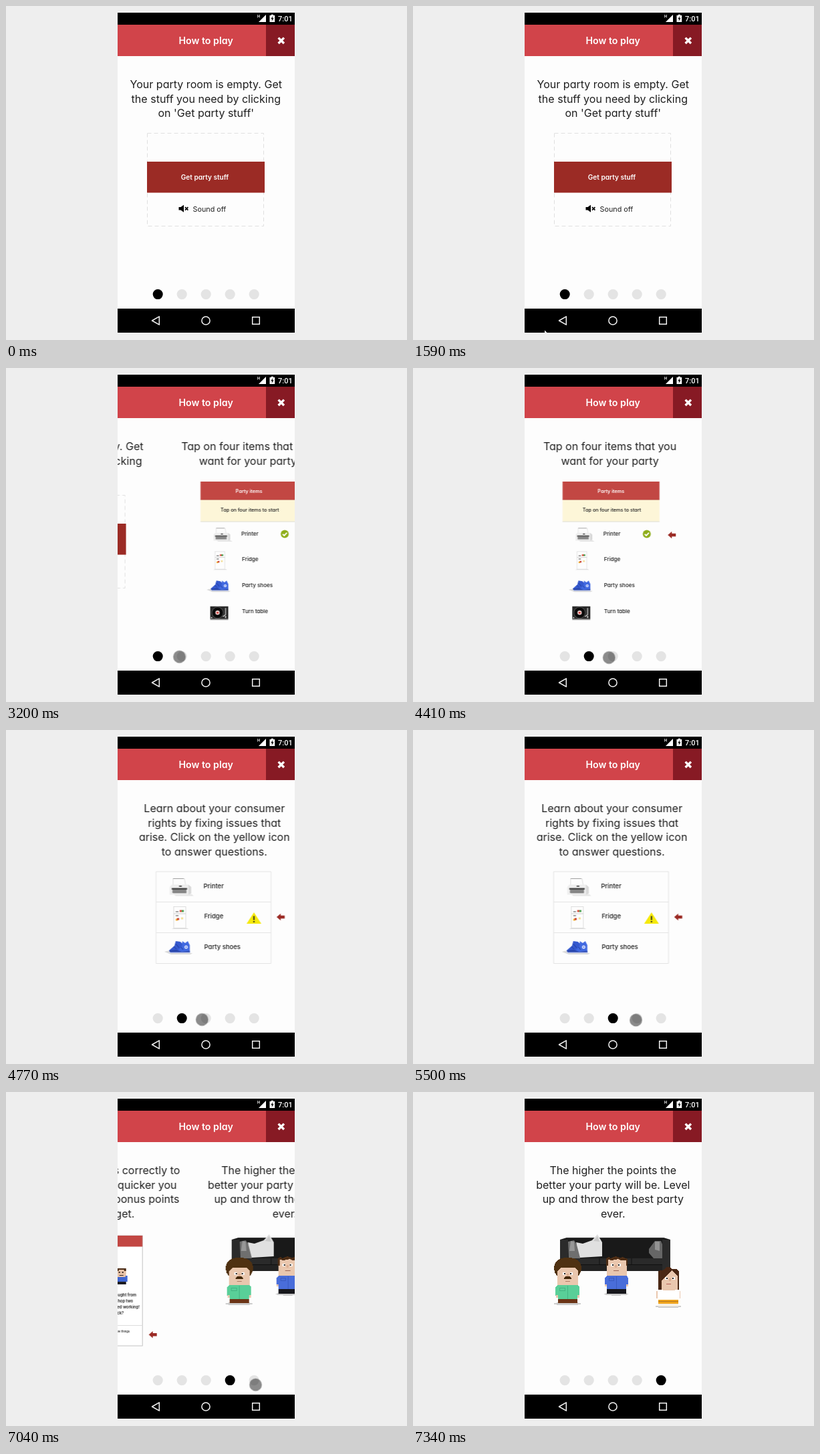
Animation, 600 px wide and 500 px high, one loop 8330 ms. Source, as an HTML page:

```html
<!DOCTYPE html>
<html lang="en">
<head>
<meta charset="utf-8">
<title>How to play</title>
<style>
html, body { margin: 0; width: 100%; height: 100%; overflow: hidden; background: #eee; }
svg { display: block; width: 100vw; height: 100vh; }
text { font-family: Inter, "Open Sans", sans-serif; font-feature-settings: "cv11"; fill: #1f1f1f; }
.lead { font-size: 16.05px; text-anchor: middle; }
.mid { text-anchor: middle; }
.white { fill: #fff; }
.bold { font-weight: 600; }
.semi { font-weight: 500; }
.red { fill: #c24743; }
.brick { fill: #9b2b25; }
.dots { fill: #e4e4e4; }
.crisp { shape-rendering: crispEdges; }

.track, .active, .touch, .mouse { animation: 8.33s infinite; }
.track { animation-name: slide; animation-timing-function: cubic-bezier(.3, .05, .35, 1); }
.active { animation-name: step; animation-timing-function: step-end; }
.touch { animation-name: tap; animation-timing-function: ease-out; }
.mouse { animation-name: peek; animation-timing-function: step-end; }

@keyframes slide {
  0%, 35.234% { transform: translateX(0); }
  41.236%, 52.653% { transform: translateX(-270px); }
  58.655%, 65.894% { transform: translateX(-540px); }
  71.897%, 82.233% { transform: translateX(-810px); }
  88.055%, 100% { transform: translateX(-1080px); }
}
@keyframes step {
  0% { transform: translateX(0); }
  41.236% { transform: translateX(36px); }
  58.655% { transform: translateX(72px); }
  71.897% { transform: translateX(108px); }
  87.995%, 100% { transform: translateX(144px); }
}
@keyframes tap {
  0%, 20.16% { transform: translate(206px, 482px); opacity: 0; }
  20.168% { transform: translate(206px, 482px); opacity: 1; }
  27.131%, 42.257% { transform: translate(259.5px, 432.3px); opacity: 1; }
  46.098%, 58.655% { transform: translate(293.3px, 433.5px); opacity: 1; }
  60.444%, 73.589% { transform: translate(333.5px, 434.3px); opacity: 1; }
  76.29%, 87.99% { transform: translate(373.5px, 438.3px); opacity: 1; }
  87.995%, 100% { transform: translate(373.5px, 438.3px); opacity: 0; }
}
@keyframes peek {
  0% { opacity: 0; }
  19.03% { opacity: 1; }
  20.168%, 100% { opacity: 0; }
}
</style>
</head>
<body>
<svg viewBox="0 0 600 500" xmlns="http://www.w3.org/2000/svg">
<defs>
  <clipPath id="phone"><rect x="167" y="10" width="265" height="479"/></clipPath>

  <path id="arrow" class="brick" d="M-6 0L0 -5.3V-2.2H6V2.2H0V5.3Z"/>

  <g id="printer">
    <path d="M-10 11H17L20 13.5H-7Z" fill="#e6e6e6"/>
    <path d="M-11 -2V-12.5H6L8 -2Z" fill="#fcfcfc" stroke="#d6d6d6" stroke-width=".8"/>
    <path d="M-11 -12.5H5" stroke="#999" stroke-width=".9"/>
    <path d="M-13 -3.5H12L16 0V10L12 11.5H-16V0Z" fill="#eee"/>
    <path d="M12 -3.5L16 0V10L12 11.5V1Z" fill="#d8d8d8"/>
    <rect x="-13" y="1.5" width="23" height="2.5" fill="#4a4a4a"/>
    <rect x="-12" y="4" width="21" height="5" fill="#858585"/>
    <path d="M-11 9.5H9" stroke="#c9c9c9" stroke-width="1"/>
    <rect x="-2" y="-2" width="4" height="1.5" fill="#333"/>
  </g>

  <g id="fridge">
    <path d="M-9 16H11L13 17.5H-12Z" fill="#dedede"/>
    <rect x="-9" y="-16" width="18" height="32" fill="#fdfdfd" stroke="#d6d6d6" stroke-width=".8"/>
    <path d="M-9 -5.5H9" stroke="#c4c4c4" stroke-width=".8"/>
    <path d="M-6 -8.5H-2M-6 -2.5H-2" stroke="#444" stroke-width="1.2"/>
    <path d="M0 -11H3V-8H0Z" fill="#d8402f"/>
    <path d="M3 -11H6V-8H3Z" fill="#3d9b43"/>
    <path d="M-6 2H-3V5H-6Z" fill="#f0b429"/>
    <path d="M-4 1H-1V4H-4Z" fill="#c8372d"/>
    <path d="M2 0H5V3H2Z" fill="#f3dc8e"/>
  </g>

  <g id="shoes">
    <path d="M-22 7Q-16 4 -9 7L20 9L17 11H-12Z" fill="#dadada"/>
    <path d="M-15 5L-7 -2L-5 -9L2 -8L6 -4L4 8L-13 8Z" fill="#3559cf"/>
    <path d="M-4 7L4 -1L5 -9L9 -6L13 -9L16 -3V8H-3Z" fill="#4169e0"/>
    <path d="M-15 5L-4 4L4 7L16 5.5V8.5H-13Z" fill="#2846ad"/>
    <path d="M-8 -1L-4 3M-5 -5L0 1M3 0L6 4" stroke="#1f3a97" stroke-width="1"/>
    <path d="M-15 8.2H16" stroke="#cfd8fa" stroke-width="1"/>
    <circle cx="10.5" cy="0" r="2.5" fill="#e8edff"/>
    <circle cx="10.5" cy="0" r="1" fill="#4169e0"/>
  </g>

  <g id="deck">
    <rect x="-13" y="-9.5" width="27" height="19" fill="#292929"/>
    <path d="M-13 9.5H14V11H-13Z" fill="#9c9c9c"/>
    <circle cx="-2" r="8.5" fill="#0a0a0a" stroke="#777" stroke-width=".7"/>
    <circle cx="-2" r="3.2" fill="#f2d9d7"/>
    <circle cx="-2" r="1.6" fill="#cf3a36"/>
    <path d="M10 -7V3L6 6" fill="none" stroke="#ddd" stroke-width="1.2"/>
    <path d="M10 5V8" stroke="#bbb" stroke-width="2"/>
    <circle cx="-11" cy="7.5" r="1" fill="#ddd"/>
  </g>

  <g id="eyes">
    <path d="M-7 0H-3V4H-7ZM4 0H8V4H4Z" fill="#fff"/>
    <path d="M-5 1H-3V3H-5ZM4 1H6V3H4Z" fill="#222"/>
    <path d="M-1 2H2V6H-1Z" fill="#dcae92"/>
  </g>
</defs>

<rect width="600" height="500" fill="#eee"/>
<g clip-path="url(#phone)">
  <rect x="167" y="10" width="265" height="479" fill="#fdfdfd"/>

  <g class="track">
    <g>
      <text class="lead" y="123"><tspan x="299.3">Your party room is empty. Get</tspan><tspan x="299.3" dy="21.6">the stuff you need by clicking</tspan><tspan x="299.3" dy="21.6">on 'Get party stuff'</tspan></text>
      <rect x="211.5" y="190.5" width="174" height="139" fill="none" stroke="#e0e0e0" stroke-dasharray="6 4"/>
      <rect class="brick" x="211" y="233" width="176" height="46.5"/>
      <text class="white bold mid" x="297.5" y="259.8" font-size="10.1">Get party stuff</text>
      <path d="M258.5 301H261.5L266 297.8V308.8L261.5 305.6H258.5Z"/>
      <path d="M268 301.2L272.4 305.6M272.4 301.2L268 305.6" stroke="#000" stroke-width="1.7"/>
      <text x="279.5" y="307.8" font-size="10.8">Sound off</text>
    </g>

    <g transform="translate(270)">
      <text class="lead" y="123"><tspan x="299.3">Tap on four items that you</tspan><tspan x="299.3" dy="21.6">want for your party</tspan></text>
      <g transform="translate(4.5)">
        <rect class="red" x="224" y="170" width="145" height="27"/>
        <text class="white bold mid" x="296.5" y="186.6" font-size="7.2">Party items</text>
        <rect x="224" y="197" width="145" height="33" fill="#fdf6d8"/>
        <path d="M224 197.3H369" stroke="#a83a36" stroke-width=".6"/>
        <path d="M224 230H369" stroke="#dcdcd4"/>
        <text class="semi mid" x="297.8" y="215.3" font-size="7.25">Tap on four items to start</text>
        <g class="semi" font-size="8.05">
          <text x="285" y="251">Printer</text>
          <text x="286" y="289">Fridge</text>
          <text x="286" y="328">Party shoes</text>
          <text x="286" y="367.3">Turn table</text>
        </g>
        <use href="#printer" transform="translate(256 249.5) scale(.78)"/>
        <use href="#fridge" transform="translate(253 288) scale(.82)"/>
        <use href="#shoes" transform="translate(252 326) scale(.85)"/>
        <use href="#deck" transform="translate(251.5 366.3)"/>
        <circle cx="350" cy="248.5" r="6" fill="#8fae1b"/>
        <path d="M346.9 248.6L349.2 250.9L353.2 246.6" fill="none" stroke="#fff" stroke-width="1.8"/>
        <use href="#arrow" x="387.5" y="250"/>
      </g>
    </g>

    <g transform="translate(540)">
      <text class="lead" y="123"><tspan x="299.3">Learn about your consumer</tspan><tspan x="299.3" dy="21.6">rights by fixing issues that</tspan><tspan x="299.3" dy="21.6">arise. Click on the yellow icon</tspan><tspan x="299.3" dy="21.6">to answer questions.</tspan></text>
      <g transform="translate(1.5)">
        <path d="M210.5 212H382.5V349.5H210.5ZM210.5 257.5H382.5M210.5 303.5H382.5" fill="none" stroke="#e4e4e4"/>
        <g class="semi" font-size="9.5">
          <text x="281.5" y="237">Printer</text>
          <text x="282.5" y="282.2">Fridge</text>
          <text x="282.5" y="328.2">Party shoes</text>
        </g>
        <use href="#printer" x="247" y="235"/>
        <use href="#fridge" x="246" y="280.5"/>
        <use href="#shoes" x="245" y="325"/>
        <path d="M357 273L368 290H346Z" fill="#f5e90a"/>
        <path d="M357 278.5V284.5M357 286V288" stroke="#222" stroke-width="1.8"/>
        <use href="#arrow" x="397" y="280"/>
      </g>
    </g>

    <g transform="translate(810)">
      <text class="lead" y="123"><tspan x="299.3">Answer questions correctly to</tspan><tspan x="299.3" dy="21.6">earn points. The quicker you</tspan><tspan x="299.3" dy="21.6">do this the more bonus points</tspan><tspan x="299.3" dy="21.6">you will get.</tspan></text>
      <rect x="257" y="215" width="99.5" height="165" fill="#fff" stroke="#b5b5b5" stroke-width=".8"/>
      <rect class="red" x="257" y="215" width="99.5" height="16.5"/>
      <text class="white bold mid" x="306.5" y="225.8" font-size="4.9">Question</text>

      <path d="M285 285H309L311 288L302 290.5L286 288Z" fill="#45a6e8"/>
      <path d="M288 287H308" stroke="#b8e0fa" stroke-width=".8"/>
      <rect x="286.5" y="248.5" width="19.5" height="36" fill="#fdfdfd" stroke="#d2d2d2" stroke-width=".8"/>
      <path d="M286.5 261H306" stroke="#c0c0c0" stroke-width=".8"/>
      <path d="M289 257.5H293.5M289 264H293.5" stroke="#333" stroke-width="1.3"/>
      <path d="M298.5 247.5L301 243L303.5 247.5Z" fill="#f2b632"/>
      <path d="M301.5 249.5L305.5 248L305 252H302.5Z" fill="#e8a59c"/>
      <rect x="299" y="265" width="4.5" height="3.5" fill="#3d9b43"/>
      <rect x="293" y="267" width="4" height="3.5" fill="#c8372d"/>
      <rect x="290" y="270" width="4" height="3.5" fill="#f0b429"/>
      <g class="crisp">
        <rect x="318" y="264" width="14" height="14" fill="#e8c3a8"/>
        <path d="M317.5 264H332V268H329V266H321V268H317.5Z" fill="#4a2b14"/>
        <path d="M321 269H323V271H321ZM326 269H328V271H326ZM322 274H328V275H322Z" fill="#3a2a24"/>
        <path d="M316.5 275H319V277H331V275H333.5V284H316.5Z" fill="#3f66d2"/>
        <rect x="318" y="284" width="14" height="3.5" fill="#1b1b22"/>
      </g>

      <text class="bold" y="306.4" font-size="5.9"><tspan x="267">That fridge you bought from</tspan><tspan x="267" dy="9">the second hand shop two</tspan><tspan x="267" dy="9">months ago stopped working!</tspan><tspan x="267" dy="9">Can you take it back?</tspan></text>
      <path d="M257 349.5H356.5" stroke="#ddd"/>
      <rect x="257" y="349.5" width="2" height="30" fill="#5c9a2e"/>
      <text class="semi" y="360" font-size="4.4"><tspan x="267.5">No. You can only take new things</tspan><tspan x="267.5" dy="6.2">back to the shop.</tspan></text>
      <use href="#arrow" x="372" y="363.3"/>
    </g>

    <g transform="translate(1080)">
      <text class="lead" y="123"><tspan x="299.3">The higher the points the</tspan><tspan x="299.3" dy="21.6">better your party will be. Level</tspan><tspan x="299.3" dy="21.6">up and throw the best party</tspan><tspan x="299.3" dy="21.6">ever.</tspan></text>

      <path d="M220 221L230 218H375L385 221V268H220Z" fill="#191919"/>
      <path d="M230 219H375" stroke="#2c2c2c" stroke-width="1.5"/>
      <path d="M220 221H232V268H220ZM373 221H385V268H373Z" fill="#2b2b2b"/>
      <path d="M232 249H373V258H232Z" fill="#2a2a2a"/>
      <path d="M232 258H373V268H232Z" fill="#222"/>
      <path d="M232 258.5H373M279 249V258M327 249V258" stroke="#111"/>
      <path d="M232 224L241 222L250 236V249H233Z" fill="#6f6f6f"/>
      <path d="M236 223L241 224L242 238H234Z" fill="#979797"/>
      <path d="M353 235L362 223H371L373 228V249H360L353 241Z" fill="#666"/>
      <path d="M362 224H369V238L362 236Z" fill="#939393"/>
      <path d="M244 225L254 227L268 222L276 213L283 225V246L250 248Z" fill="#e0e0e0"/>
      <path d="M270 223L276 216L279 224Z" fill="#c9c9c9"/>

      <g class="crisp">
        <ellipse cx="231" cy="317" rx="20" ry="2.5" fill="#ccc"/>
        <path d="M211 262Q213 248 231.5 248T252 262Q252 272 246 276H217Q211 272 211 262Z" fill="#4f3112"/>
        <path d="M216 268L221 263H242L247 268V291H216Z" fill="#eac7ae"/>
        <use href="#eyes" x="231" y="270"/>
        <path d="M226 279L228 276H235L237 279V280H226Z" fill="#432708"/>
        <path d="M228 283H235" stroke="#b07a66"/>
        <path d="M213 292L216 289H247L249 292V305H213Z" fill="#59cf98"/>
        <path d="M214 304H217V308H214ZM246 304H249V308H246Z" fill="#eac7ae"/>
        <rect x="217" y="300" width="29" height="11" fill="#59cf98"/>
        <path d="M231 290V310M219 293H227V297H219Z" fill="none" stroke="#45b483"/>
        <rect x="217" y="310" width="29" height="6" fill="#6b3416"/>

        <ellipse cx="304" cy="302.5" rx="18" ry="2.2" fill="#ccc"/>
        <rect x="290" y="249" width="30" height="28" fill="#eac7ae"/>
        <path d="M289 249L293 247L296 249L303 246L309 248L314 247L321 250V260H319V252H311L307 250L298 252L292 251V260H289Z" fill="#4c2c14"/>
        <use href="#eyes" x="303" y="257"/>
        <path d="M300 267H308" stroke="#9c6450"/>
        <path d="M287 279L290 275H320L322 279V290H287Z" fill="#496dda"/>
        <path d="M287 288H290V291H287ZM319 288H322V291H319Z" fill="#eac7ae"/>
        <rect x="290" y="286" width="29" height="10" fill="#496dda"/>
        <path d="M304 276V295M293 278H300V282H293Z" fill="none" stroke="#3b5bc0"/>
        <rect x="290" y="295" width="29" height="6.5" fill="#17171c"/>

        <ellipse cx="382" cy="321" rx="19" ry="2.4" fill="#ccc"/>
        <path d="M376 266L379 262H384L387 265H394L398 269V297H367V268Z" fill="#4a2714"/>
        <path d="M372 282L388 267L396 276V297H372Z" fill="#eac7ae"/>
        <use href="#eyes" x="384" y="277"/>
        <path d="M379 287H386" stroke="#b5605a"/>
        <path d="M364 298H368V309H364ZM397 298H400V309H397Z" fill="#eac7ae"/>
        <path d="M366 296H372L378 298H388L393 296H399V311H366Z" fill="#fff"/>
        <path d="M367 311H397V317H367Z" fill="#f0a51e"/>
        <path d="M367 313.5H397" stroke="#b3741a"/>
        <path d="M367 317H397V321H367Z" fill="#f6f0e4"/>
      </g>
    </g>
  </g>

  <g class="dots">
    <circle cx="227.2" cy="431.6" r="7.6"/>
    <circle cx="263.2" cy="431.6" r="7.6"/>
    <circle cx="299.2" cy="431.6" r="7.6"/>
    <circle cx="335.2" cy="431.6" r="7.6"/>
    <circle cx="371.2" cy="431.6" r="7.6"/>
  </g>
  <circle class="active" cx="227.2" cy="431.6" r="7.5"/>

  <rect x="167" y="10" width="265" height="18"/>
  <path d="M389 13V24H378Z" fill="#fff"/>
  <path d="M376.7 13V17.6M379.3 13V17.6M376.7 15.3H379.3" stroke="#ddd" stroke-width=".9"/>
  <path d="M394.5 14H396.8V12.8H400V14H402.2V24H394.5Z" fill="#fff"/>
  <path d="M399.4 15L396.2 19.6H398.2L397.5 23L400.6 18.3H398.7Z"/>
  <text class="white" x="407" y="23" style="font-family:Roboto,sans-serif;font-size:11px;font-weight:500">7:01</text>

  <rect x="167" y="28" width="265" height="47" fill="#d1444a"/>
  <rect x="389" y="28" width="43" height="47" fill="#871a24"/>
  <text class="white bold mid" x="299.2" y="57" font-size="14.2">How to play</text>
  <path d="M407.6 47.6L416 56M416 47.6L407.6 56" stroke="#fff" stroke-width="3.4"/>

  <rect x="167" y="453" width="265" height="36"/>
  <g fill="none" stroke="#f4f4f4" stroke-width="1.5">
    <path d="M218.5 471L229.3 464.8V477.2Z" stroke-linejoin="round"/>
    <circle cx="299" cy="471" r="6.1"/>
    <rect x="368.7" y="465.7" width="10.6" height="10.6"/>
  </g>

  <path class="mouse" d="M197 485.5V498L200 495.4L205.5 494Z" fill="#fff"/>
  <circle class="touch" r="9.2" fill="rgba(0,0,0,.45)" stroke="rgba(0,0,0,.12)" stroke-width="1"/>
</g>
</svg>
</body>
</html>
```
